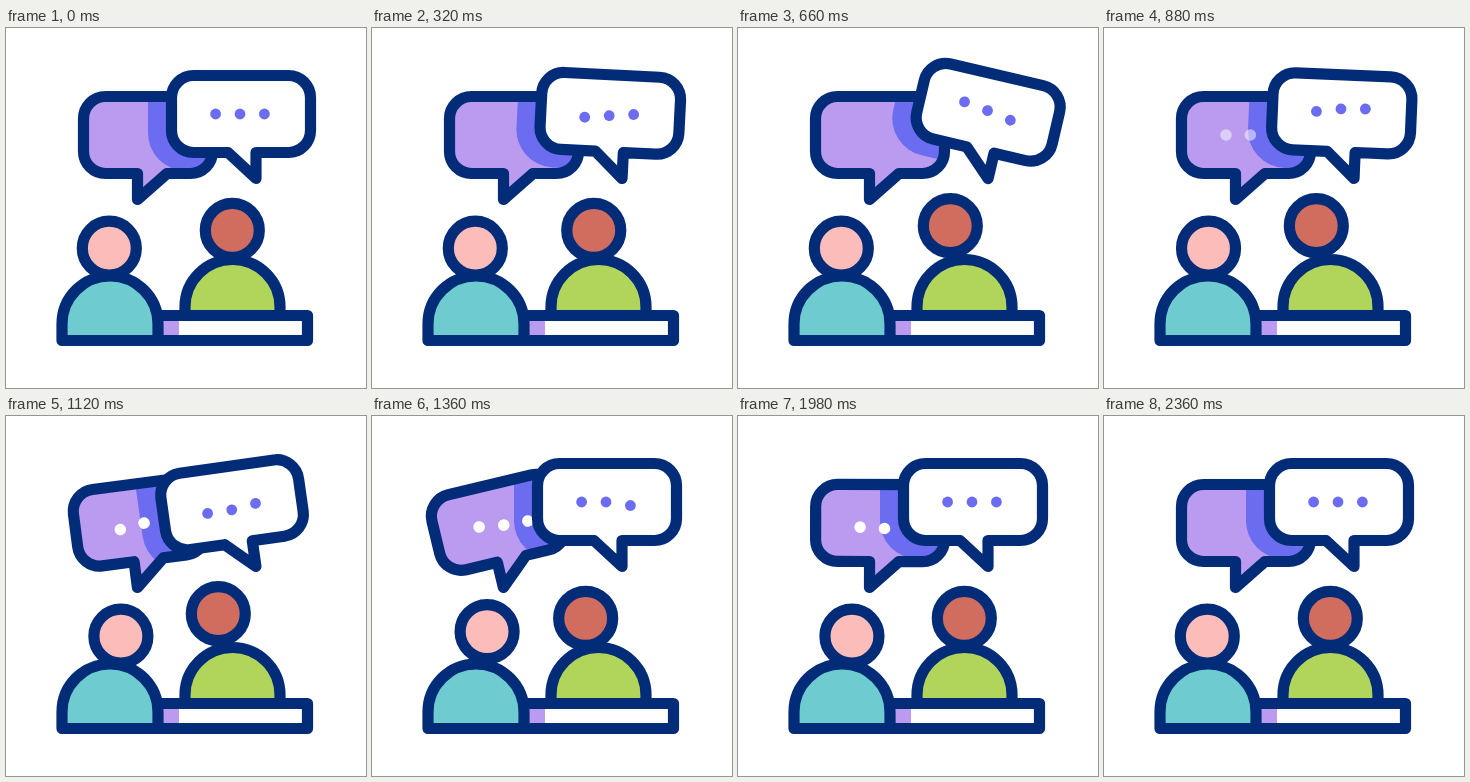
Write an HTML page that moves like this. It is 360x360 px and loops after 2.4 s.

```html
<!DOCTYPE html>
<html lang="en">
<head>
<meta charset="utf-8">
<title>Conversation</title>
<style>
  html, body { margin: 0; width: 100%; height: 100%; overflow: hidden; background: #fff; }
  svg { display: block; width: 100%; height: 100%; }
  .line { stroke: #022c78; stroke-width: 11.2; stroke-linejoin: round; }
</style>
</head>
<body>
<svg viewBox="0 0 360 360">
  <defs>
    <path id="leftShape"/>
    <clipPath id="leftClip"><use id="leftMask" href="#leftShape"/></clipPath>
  </defs>

  <use id="leftFill" href="#leftShape" fill="#ba9bf0"/>
  <g clip-path="url(#leftClip)">
    <rect id="shade" x="142" y="20" width="190" height="123" rx="38" fill="#6b6cf0"/>
  </g>
  <g id="leftTop">
    <use href="#leftShape" class="line" fill="none"/>
    <g id="leftDots" fill="#fff"></g>
  </g>

  <g id="right">
    <path id="rightShape" class="line" fill="#fff"/>
    <g id="rightDots" fill="#6c6cf0"></g>
  </g>

  <path class="line" fill="#b1d55b" d="M179 287.500V279A47.500 47.500 0 0 1 274 279V287.500Z"/>
  <rect class="line" fill="#fff" x="152" y="287.500" width="149.500" height="25"/>
  <rect fill="#ba9bf0" x="157" y="293" width="16" height="14"/>
  <path class="line" fill="#6ecbcf" d="M56 312.500V296A48 48 0 0 1 152 296V312.500Z"/>
  <circle id="rightHead" class="line" fill="#d16d5f" r="27"/>
  <circle id="leftHead" class="line" fill="#fcbcba" r="27"/>
</svg>
<script>
const LOOP = 2400;
const HEAD_LAG = 620;   // the left speaker answers the right one
const DOTS_LAG = 820;
const DOT_STEP = 90;
const $ = id => document.getElementById(id);

// Eased progress from 0 to 1 between two times
function ramp(t, from, to) {
  const p = Math.min(1, Math.max(0, (t - from) / (to - from)));
  return (1 - Math.cos(Math.PI * p)) / 2;
}

// Rounded box whose tail goes from the root down to the tip and straight back up
function bubble(x, y, w, root, tip, drop) {
  const h = 77, r = 22, bottom = y + h;
  const corner = (dx, dy) => `a${r} ${r} 0 0 1 ${dx} ${dy}`;
  const tail = [`${root} ${bottom}`, `${tip} ${bottom + drop}`, `${tip} ${bottom}`];
  if (root < tip) tail.reverse();
  return `M${x + r} ${y}h${w - 2 * r}${corner(r, r)}v${h - 2 * r}${corner(-r, r)}` +
    `L${tail.join("L")}H${x + r}${corner(-r, -r)}v${2 * r - h}${corner(r, -r)}Z`;
}

function makeDots(group, x, r) {
  return [0, 1, 2].map(i => {
    const dot = document.createElementNS("http://www.w3.org/2000/svg", "circle");
    dot.setAttribute("cx", x + i * 24.4);
    dot.setAttribute("r", r);
    group.append(dot);
    return dot;
  });
}

$("leftShape").setAttribute("d", bubble(77.5, 68.5, 129, 161, 131.5, 26));
$("rightShape").setAttribute("d", bubble(165.5, 47.5, 139, 222, 250, 26));
const leftDots = makeDots($("leftDots"), 122, 5.8);
const rightDots = makeDots($("rightDots"), 209.6, 5.4);

function tilt(ids, angle, x, y) {
  for (const id of ids) $(id).setAttribute("transform", `rotate(${angle} ${x} ${y})`);
}

// One and a half waves, dot after dot
function bounce(dots, y, t) {
  dots.forEach((dot, i) => {
    const p = Math.min(1, Math.max(0, (t - i * DOT_STEP - 180) / 1080));
    dot.setAttribute("cy", y + 5.5 * Math.sin(3 * Math.PI * p));
  });
}

// Slide towards the other speaker, rise, sink, slide home
function moveHead(head, x, y, reach, t) {
  head.setAttribute("cx", x + reach * (ramp(t, 190, 530) - ramp(t, 1290, 1640)));
  head.setAttribute("cy", y - 4.6 * (ramp(t, 510, 650) - ramp(t, 1160, 1340)));
}

function draw(t) {
  const rightAngle = 13.8 * ramp(t, 200, 600) - 22 * ramp(t, 600, 1150) + 8.2 * ramp(t, 1150, 1350);
  const leftAngle = -13.6 * ramp(t, 870, 1345) + 24.4 * ramp(t, 1345, 1700) - 10.8 * ramp(t, 1700, 2000);
  tilt(["right", "shade"], rightAngle, 250, 151);
  tilt(["leftFill", "leftTop", "leftMask"], leftAngle, 131.5, 172);

  bounce(rightDots, 86, t);
  bounce(leftDots, 107, t - DOTS_LAG);
  $("leftDots").setAttribute("opacity", ramp(t, 820, 940) - ramp(t, 2020, 2140));

  moveHead($("rightHead"), 226.3, 202.3, -14, t);
  moveHead($("leftHead"), 103.3, 220.2, 11.8, t - HEAD_LAG);
}

const start = performance.now();
function frame() {
  draw((performance.now() - start) % LOOP);
  requestAnimationFrame(frame);
}
draw(0);
requestAnimationFrame(frame);
</script>
</body>
</html>
```
